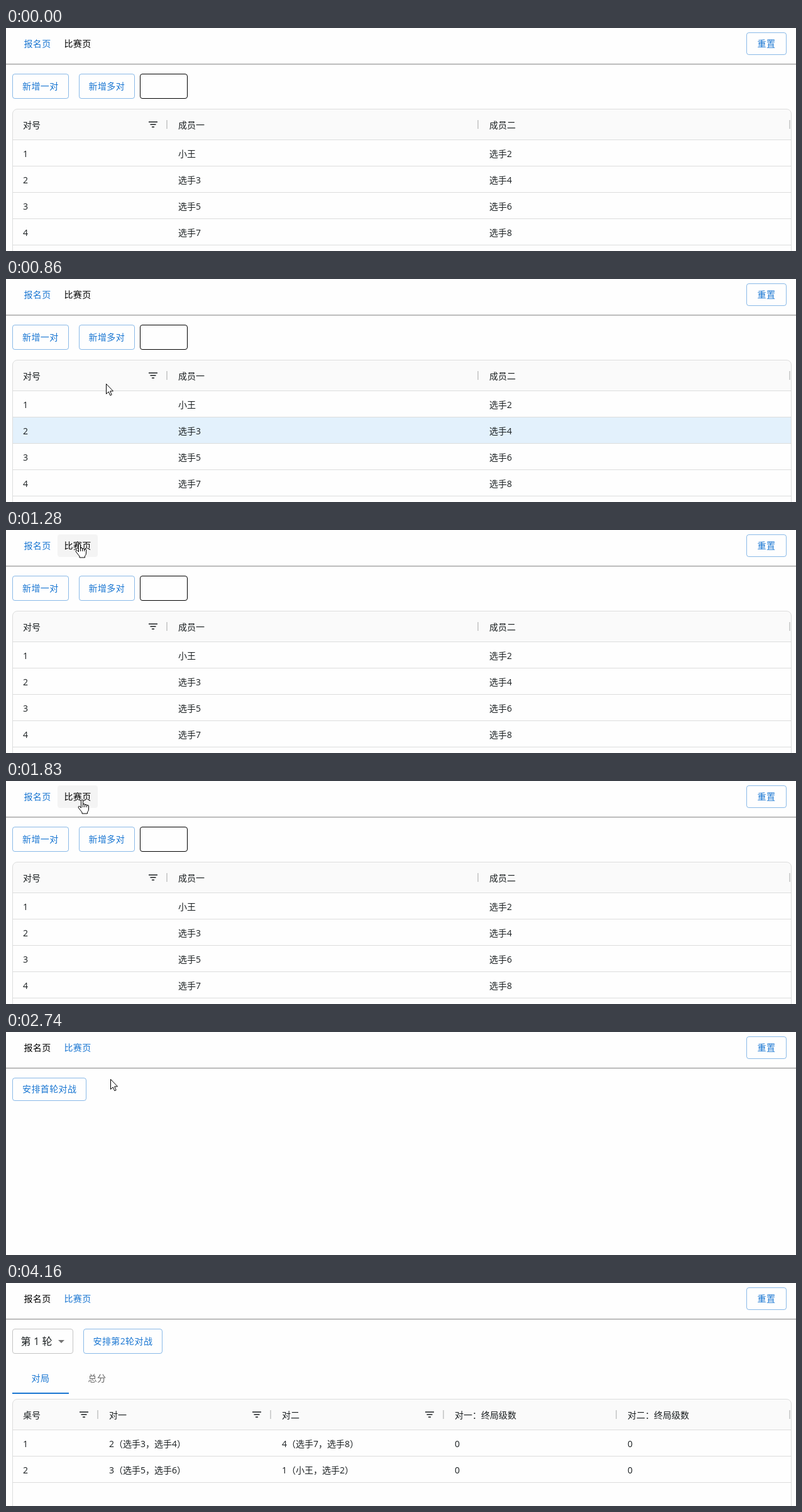
These frames come from a looping animation (1257 px wide and 356 px high, 5420 ms). An HTML page:

```html
<!DOCTYPE html>
<html lang="zh-CN">
<head>
<meta charset="utf-8">
<title>比赛编排</title>
<style>
  html, body { margin: 0; width: 100%; height: 100%; overflow: hidden; background: #fefefe; }
  svg { display: block; width: 1257px; height: 356px; }
  text { font: 14px "Open Sans", "Noto Sans CJK SC", sans-serif; fill: #181d1f; white-space: pre; }
  .btn { letter-spacing: .4px; fill: #1976d2; }
  .box { fill: none; stroke: rgba(25, 118, 210, .5); }
  .hover { fill: rgba(25, 118, 210, .04); stroke: #1976d2; }
  .line { stroke: #dcdddd; }
  .icon { stroke: #181d1f; stroke-width: 1.6; fill: none; }
  .pointer path { fill: #fff; stroke: #000; stroke-linejoin: round; }
</style>
</head>
<body>
<svg viewBox="0 0 1257 356">
  <clipPath id="pillClip"><rect x="82" y="7" width="64" height="36" rx="4"/></clipPath>
  <rect id="pill" x="82" y="7" width="64" height="36" rx="4"/>
  <g clip-path="url(#pillClip)"><circle id="ripple" cx="121" cy="29"/></g>
  <g id="nav"></g>
  <path d="M0 57.5H1257" stroke="#9a9a9a"/>
  <path d="M0 58.5H1257" stroke="#e2e2e2"/>
  <g id="signup"></g>
  <g id="start"></g>
  <g id="match"></g>
  <g class="pointer" id="pointer">
    <path id="arrow" d="M.5 .5V16.5L4.2 13L6.8 18.8L9.2 17.8L6.7 12H11.5Z"/>
    <path id="hand" d="M-1.5 13V1.5a1.5 1.5 0 0 1 3 0V8a1.5 1.5 0 0 1 3 0V9a1.5 1.5 0 0 1 3 0V10a1.5 1.5 0 0 1 3 0V15q0 3-2 4.5V22H0V20L-5.5 13q-1-2 .5-2.8q1.5-.4 3.5 2.8zM1.5 8V12M4.5 9V12M7.5 10V12"/>
  </g>
</svg>
<script>
const LOOP = 5420;
const $ = id => document.getElementById(id);

// Static drawing helpers
const text = (x, y, str, attr = '') => `<text x="${x}" y="${y}" ${attr}>${str}</text>`;
const label = (x, y, str, id = '') => text(x, y, str, `class="btn" id="${id}"`);
const frame = (x, y, w, h, attr = 'class="box"') =>
  `<rect x="${x + .5}" y="${y + .5}" width="${w - 1}" height="${h - 1}" rx="3.5" ${attr}/>`;
const filterIcon = (x, y) =>
  `<path class="icon" d="M${x - 7} ${y - 4}h14M${x - 4.5} ${y}h9M${x - 2} ${y + 4}h4"/>`;

// cols: [text x, title, separator x, filter icon x]
function grid(top, cols, rows, lines) {
  let out = `<path fill="#fafafa" d="M11 ${top + 49}V${top + 8}q0-7 7-7H1242q7 0 7 7v41z"/>`;
  for (let i = 0; i < lines; i++) {
    const y = top + 50 + 42 * i;
    out += `<rect class="row" x="11" y="${y}" width="1238" height="41" fill="#e3f1fc" visibility="hidden"/>`;
  }
  for (let i = 0; i <= lines; i++) out += `<path class="line" d="M11 ${top + 49.5 + 42 * i}H1249"/>`;
  for (const [x, title, sep, icon] of cols) {
    out += text(x, top + 31, title);
    out += `<rect x="${sep}" y="${top + 18}" width="2" height="14" fill="#d0d1d1"/>`;
    if (icon) out += filterIcon(icon, top + 25);
  }
  rows.forEach((row, r) => row.forEach((cell, c) => {
    out += text(cols[c][0], top + 77 + 42 * r, cell);
  }));
  return out + `<rect class="line" x="10.5" y="${top + .5}" width="1239" height="400" rx="7.5" fill="none"/>`;
}

$('nav').innerHTML =
  label(28.4, 30, '报名页', 'tabA') + label(92.4, 30, '比赛页', 'tabB') +
  frame(1178, 7, 64, 36) + label(1195.6, 30, '重置');

$('signup').innerHTML =
  frame(10, 73, 90, 40) + label(26, 98, '新增一对') +
  frame(116, 73, 89, 40) + label(131.5, 98, '新增多对') +
  frame(213, 73, 76, 40, 'fill="none" stroke="#000"') +
  grid(129,
    [[27, '对号', 255, 234], [274, '成员一', 750], [769, '成员二', 1246]],
    [['1', '小王', '选手2'], ['2', '选手3', '选手4'], ['3', '选手5', '选手6'], ['4', '选手7', '选手8']], 5);

$('start').innerHTML = frame(10, 73, 118, 37, 'class="box" id="first"') + label(26, 96, '安排首轮对战');

$('match').innerHTML =
  frame(10, 73, 97, 40, 'fill="none" stroke="#c4c4c4"') +
  text(23.5, 99, '第 1 轮', 'style="font-size:16px;letter-spacing:.15px"') +
  '<path d="M83 91h10l-5 5z" fill="#757575"/>' +
  frame(123, 73, 126, 40, 'class="box" id="next"') + label(138.5, 98, '安排第2轮对战') +
  label(40.6, 157, '对局') + text(130.6, 157, '总分', 'style="fill:#666;letter-spacing:.4px"') +
  '<rect x="10" y="175" width="90" height="2" fill="#1976d2"/>' +
  grid(185,
    [[27, '桌号', 145, 124], [164, '对一', 420, 399], [439, '对二', 695, 674],
     [714, '对一：终局级数', 970], [989, '对二：终局级数', 1246]],
    [['1', '2（选手3，选手4）', '4（选手7，选手8）', '0', '0'],
     ['2', '3（选手5，选手6）', '1（小王，选手2）', '0', '0']], 2);

const rows = $('signup').querySelectorAll('.row');

// Pointer waypoints: [ms, x, y]
const path = [
  [790, 185, 308], [860, 159, 166], [930, 134, 64], [1000, 122, 40], [1140, 118, 27],
  [1270, 117, 22], [1350, 117, 22], [1500, 119, 27], [1650, 121, 30], [2110, 121, 30],
  [2250, 150, 40], [2390, 200, 38], [2460, 216, 26], [2530, 218, 22], [2670, 192, 58],
  [2810, 140, 92], [2920, 114, 102], [3080, 110, 97], [3690, 110, 97], [3760, 124, 97],
  [3830, 190, 100], [3900, 300, 122], [4030, 640, 215], [4100, 949, 336]
];

function pointerAt(t) {
  const i = path.findIndex(p => p[0] > t);
  if (i < 0) return path[path.length - 1].slice(1);
  if (i === 0) return path[0].slice(1);
  const [a, ax, ay] = path[i - 1], [b, bx, by] = path[i];
  const k = (t - a) / (b - a);
  return [Math.round(ax + (bx - ax) * k), Math.round(ay + (by - ay) * k)];
}

// The screen refreshes in coarse ticks
function snap(t) {
  if (t < 780) return t;
  return t < 3760
    ? 790 + Math.floor((t - 780) / 69.6) * 69.6
    : 3760 + Math.floor((t - 3760) / 66.6) * 66.6;
}

function ease(x) {
  const u = Math.min(1, Math.max(0, x)) ** .65;
  return u * u * (3 - 2 * u);
}

const show = (el, on) => el.setAttribute('visibility', on ? 'visible' : 'hidden');
const display = (id, on) => { $(id).style.display = on ? '' : 'none'; };

function draw(ms) {
  const t = snap(ms);
  const page = t < 1890 ? 'signup' : t < 3070 ? 'start' : 'match';
  for (const id of ['signup', 'start', 'match']) display(id, id === page);

  const visible = t >= 785 && t < 4150;
  const [x, y] = pointerAt(t);
  const over = (l, top, r, b) => visible && x >= l && x < r && y >= top && y < b;
  const onTab = over(82, 7, 146, 43);
  const onFirst = page === 'start' && over(10, 73, 128, 110);
  const onNext = page === 'match' && over(123, 73, 249, 113);
  const hand = onTab || onFirst || onNext;
  display('pointer', visible);
  display('hand', hand);
  display('arrow', !hand);
  $('pointer').setAttribute('transform', `translate(${x} ${y})`);
  $('first').setAttribute('class', onFirst ? 'box hover' : 'box');
  $('next').setAttribute('class', onNext ? 'box hover' : 'box');

  const hot = !visible ? -1 : t < 855 ? 3 : t < 925 ? 1 : -1;
  rows.forEach((row, i) => show(row, i === hot && page === 'signup'));

  const chosen = t >= 1960;
  const ink = chosen ? '#1976d2' : '#000';
  $('tabA').style.fill = chosen ? '#000' : '#1976d2';
  $('tabB').style.fill = ink;
  display('pill', onTab);
  $('pill').setAttribute('fill', ink);
  $('pill').setAttribute('fill-opacity', .04);

  const grow = ease((t - 1800) / 550), fade = ease((t - 1890) / 550);
  display('ripple', t > 1890 && fade < 1);
  $('ripple').setAttribute('r', 46.6 * grow);
  $('ripple').setAttribute('fill', ink);
  $('ripple').setAttribute('fill-opacity', (.1 + .2 * grow) * (1 - fade));
}

const begin = performance.now();
function tick() {
  draw((performance.now() - begin) % LOOP);
  requestAnimationFrame(tick);
}
tick();
</script>
</body>
</html>
```
